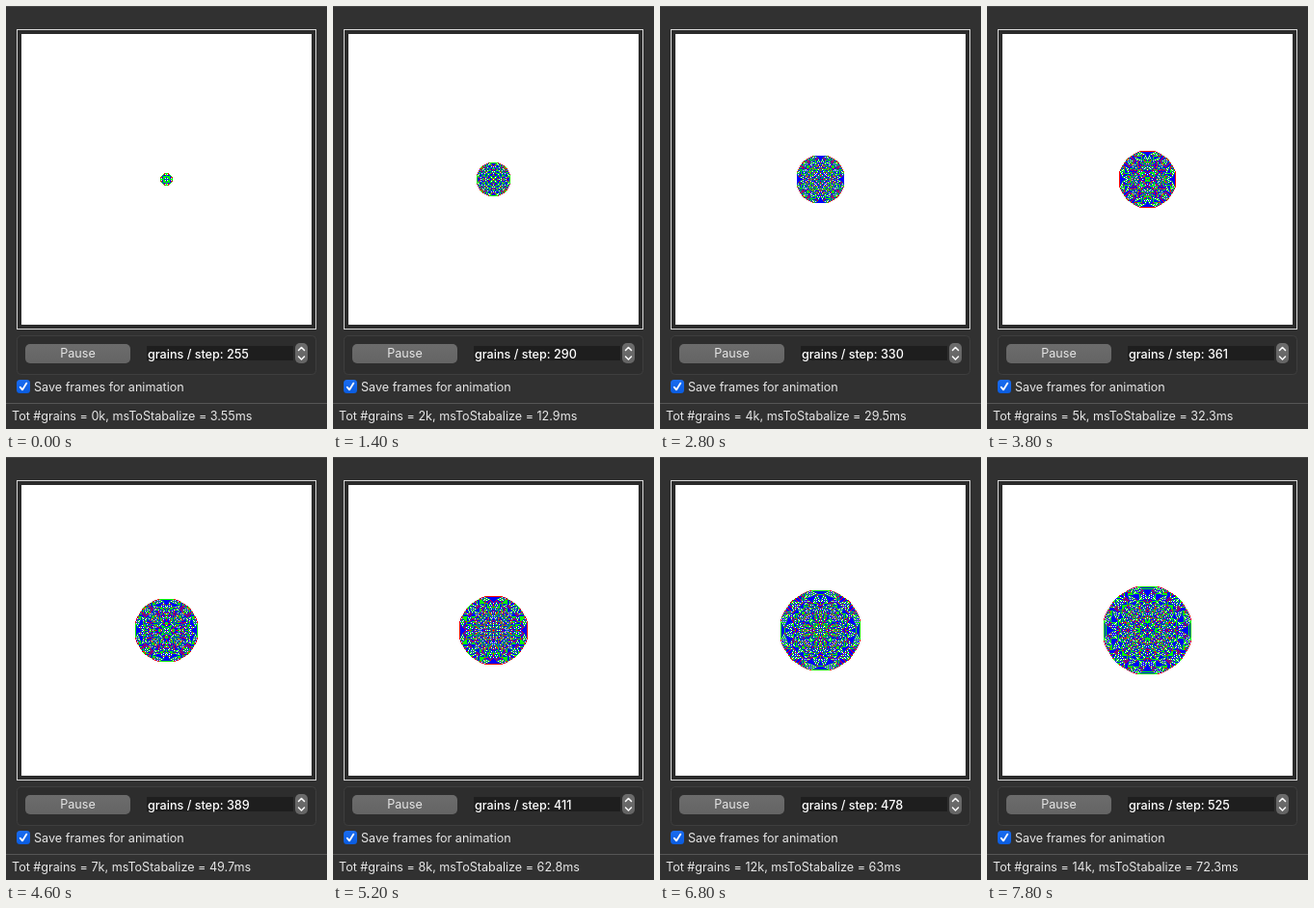
Recreate the animation shown at these times as an HTML page with a canvas. Size 333 by 438 pixels, loop 8 s.

```html
<!DOCTYPE html>
<html lang="en">
<head>
<meta charset="utf-8">
<title>Sandpile</title>
<style>
  html, body { margin: 0; width: 100%; height: 100%; overflow: hidden; background: #313131; }
  canvas { display: block; }
</style>
</head>
<body>
<canvas id="stage" width="333" height="438"></canvas>
<script>
const ctx = document.getElementById('stage').getContext('2d');
const STEP = 200, COUNT = 40;
const SIZE = 301, MID = 150;          // sandpile grid, one cell per pixel
const PALETTE = [[255, 255, 255], [255, 0, 0], [0, 255, 0], [0, 0, 255]];
// stabilising time in ms at a few steps, interpolated between
const TIMES = [[0, 3.55], [7, 12.9], [14, 29.5], [19, 32.3], [26, 62.8], [34, 63], [39, 72.3]];

const grid = new Int32Array(SIZE * SIZE);

function drop(grains) {
  const mid = MID * SIZE + MID;
  grid[mid] += grains;
  const stack = [mid];
  while (stack.length) {
    const i = stack.pop(), share = grid[i] >> 2;
    if (!share) continue;
    grid[i] &= 3;
    for (const j of [i - 1, i + 1, i - SIZE, i + SIZE]) {
      grid[j] += share;
      if (grid[j] > 3) stack.push(j);
    }
  }
}

function snapshot() {
  const image = new ImageData(SIZE, SIZE);
  grid.forEach((n, i) => image.data.set([...PALETTE[n], 255], i * 4));
  return image;
}

function stabiliseTime(k) {
  const b = Math.max(1, TIMES.findIndex(p => p[0] >= k));
  const [k0, t0] = TIMES[b - 1], [k1, t1] = TIMES[b];
  return +(t0 + (t1 - t0) * (k - k0) / (k1 - k0)).toPrecision(3);
}

function buildSteps() {
  const steps = [];
  let grains = 250, total = 0;
  for (let k = 0; k < COUNT; k++) {
    drop(grains);
    total += grains;
    grains = Math.floor(grains * 102 / 100);
    steps.push({ image: snapshot(), grains, kilo: Math.floor(total / 1000), ms: stabiliseTime(k) });
  }
  return steps;
}

function rect(x, y, w, h, fill) {
  ctx.fillStyle = fill;
  ctx.fillRect(x, y, w, h);
}

function round(x, y, w, h, r, fill, stroke) {
  ctx.beginPath();
  ctx.roundRect(x, y, w, h, r);
  if (fill) { ctx.fillStyle = fill; ctx.fill(); }
  if (stroke) { ctx.strokeStyle = stroke; ctx.lineWidth = 1; ctx.stroke(); }
}

function line(points, width) {
  ctx.beginPath();
  points.forEach(([x, y]) => ctx.lineTo(x, y));
  ctx.strokeStyle = '#fff';
  ctx.lineWidth = width;
  ctx.lineCap = ctx.lineJoin = 'round';
  ctx.stroke();
}

function text(str, x, y, fill, weight = 400, align = 'left') {
  ctx.font = `${weight} 12.6px Inter, sans-serif`;
  ctx.textAlign = align;
  ctx.fillStyle = fill;
  ctx.fillText(str, x, y);
}

function vertical(y0, y1, top, bottom) {
  const g = ctx.createLinearGradient(0, y0, 0, y1);
  g.addColorStop(0, top);
  g.addColorStop(1, bottom);
  return g;
}

function draw({ image, grains, kilo, ms }) {
  rect(0, 0, 333, 438, '#313131');
  rect(0, 0, 333, 1, '#464646');

  rect(11, 24, 311, 311, '#d8d8d8');
  rect(12, 25, 309, 309, '#2b2b2b');
  ctx.putImageData(image, 16, 29);

  round(11.5, 341.5, 310, 40, 4, '#2d2d2d', '#3e3e3e');
  round(20, 350, 109, 20, 5, vertical(350, 370, '#6c6c6c', '#646464'));
  text('Pause', 74.5, 364, '#e6e6e6', 400, 'center');
  rect(146, 352, 152, 15, '#1e1e1e');
  text(`grains / step: ${grains}`, 147, 364.5, '#fff', 500);
  round(300, 349, 13, 21, 5, vertical(349, 370, '#6c6c6c', '#646464'));
  line([[303.5, 356.5], [306.5, 353.5], [309.5, 356.5]], 1.5);
  line([[303.5, 363], [306.5, 366], [309.5, 363]], 1.5);

  round(11, 387, 14, 14, 3.5, vertical(387, 401, '#1a6cf0', '#0a5ce0'));
  line([[14.7, 394.6], [17, 397.4], [21.3, 390.6]], 1.8);
  text('Save frames for animation', 29, 399, '#e6e6e6');

  rect(0, 411, 333, 1, '#565656');
  text(`Tot #grains = ${kilo}k, msToStabalize = ${ms}ms`, 6, 429, '#e6e6e6');
}

const steps = buildSteps();

function tick() {
  draw(steps[Math.floor(performance.now() / STEP) % COUNT]);
  requestAnimationFrame(tick);
}
tick();
</script>
</body>
</html>
```
